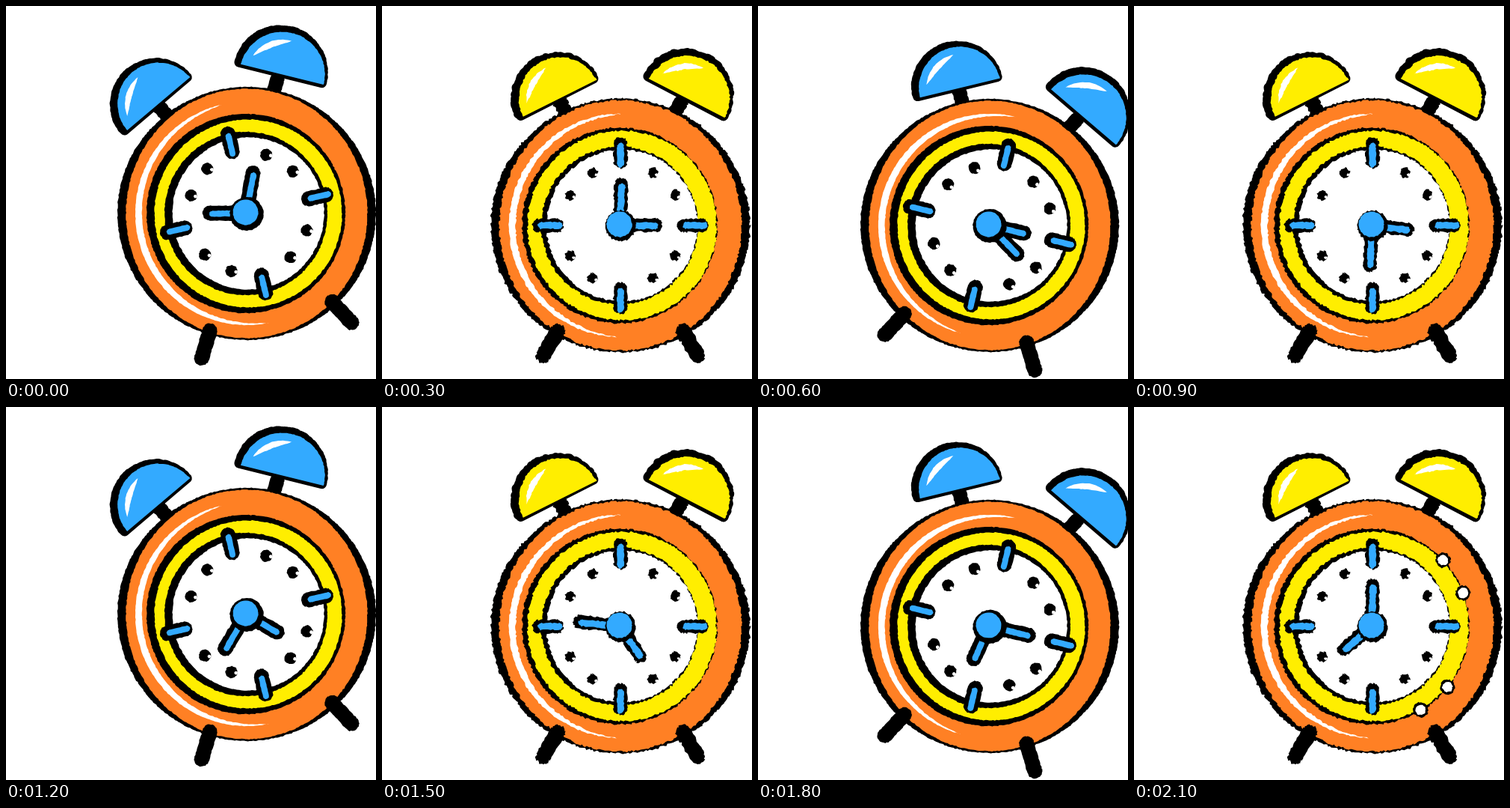
Write an HTML page with a canvas that moves like this. It is 495 px wide and 498 px high and loops after 2400 ms.

```html
<!DOCTYPE html>
<html lang="en">
<head>
<meta charset="utf-8">
<title>Alarm clock</title>
<style>
html, body { margin: 0; width: 100%; height: 100%; overflow: hidden; background: #fff; }
canvas { display: block; }
</style>
</head>
<body>
<canvas id="stage" width="495" height="498"></canvas>
<script>
const ctx = document.getElementById('stage').getContext('2d');
const BLACK = '#000', WHITE = '#fff', ORANGE = '#ff8024', YELLOW = '#ffee00', BLUE = '#33aaff';
const STEP = 300, DEG = Math.PI / 180;

// Each lean: centre, angle, bell colour, edge roughness, line widths and ring radii from outside in.
const TILTED = { bell: BLUE, rough: 0.55, bar: 20, stripe: 8, hub: 22.5, dot: 8, radii: [171, 164, 133, 125.5, 109, 101.5] };
const LEFT = { ...TILTED, x: 322, y: 277, angle: -13.3 };
const RIGHT = { ...TILTED, x: 310, y: 293, angle: 13.3 };
const UP = { x: 319, y: 293, angle: 0, bell: YELLOW, rough: 1.3, bar: 18, stripe: 9, hub: 20.5, dot: 6.8, radii: [171.5, 164.5, 130.5, 126.5, 105, 101] };

// Ring colour, sideways offset and widening.
const RINGS = [[BLACK, 0, 2], [ORANGE, 0, -2.5], [BLACK, -1, 0], [YELLOW, 2, 0], [BLACK, -1, 0], [WHITE, 2, 0]];

// Lean plus clockwise directions of the long and the short hand.
const POSES = [
  [LEFT, 10, 270], [UP, 2, 90], [RIGHT, 136, 103], [UP, 183, 97],
  [LEFT, 211, 120], [UP, 276, 146], [RIGHT, 103, 205], [UP, 1, 230]
];

let seed = 1;
function random() {
  seed = (seed * 16807) % 2147483647;
  return seed / 2147483647;
}

// Fills a polygon whose edge wobbles like dry chalk; a border widens it with round corners.
function fill(pts, color, rough, border = 0) {
  ctx.beginPath();
  for (const [x, y] of pts) {
    ctx.lineTo(x + (random() * 2 - 1) * rough, y + (random() * 2 - 1) * rough);
  }
  ctx.closePath();
  ctx.fillStyle = ctx.strokeStyle = color;
  ctx.fill();
  if (border) {
    ctx.lineWidth = border * 2;
    ctx.lineJoin = 'round';
    ctx.stroke();
  }
}

function path(n, point) {
  return Array.from({ length: n + 1 }, (_, i) => point(i / n));
}

function arc(x, y, rx, ry, from, to) {
  const n = Math.ceil(Math.abs(to - from) * DEG * (rx + ry) / 5) + 4;
  return path(n, t => {
    const a = (from + (to - from) * t) * DEG;
    return [x + rx * Math.cos(a), y + ry * Math.sin(a)];
  });
}

function disc(x, y, r, color, rough, widen = 0) {
  fill(arc(x, y, r + widen, r - widen, 0, 360), color, rough);
}

function bar(x0, y0, x1, y1, width, color, rough) {
  const dir = Math.atan2(y1 - y0, x1 - x0) / DEG, r = width / 2;
  const length = Math.hypot(x1 - x0, y1 - y0), n = Math.ceil(length / 3);
  const head = arc(x1, y1, r, r, dir - 90, dir + 90);
  const tail = arc(x0, y0, r, r, dir + 90, dir + 270);
  const side = (a, b) => path(n, t => [a[0] + (b[0] - a[0]) * t, a[1] + (b[1] - a[1]) * t]);
  fill([...head, ...side(head[head.length - 1], tail[0]), ...tail,
    ...side(tail[tail.length - 1], head[0])], color, rough);
}

// Crescent of light that tapers to both ends.
function gleam(r, from, to, width, rough) {
  const n = Math.ceil(r * (to - from) * DEG / 3);
  const edge = depth => path(n, t => {
    const a = (from + (to - from) * t) * DEG;
    const d = r - depth * Math.sin(Math.PI * t) ** 0.7;
    return [d * Math.cos(a), d * Math.sin(a)];
  });
  fill([...edge(0), ...edge(width).reverse()], WHITE, rough);
}

function bell(side, color, rough) {
  const r = 56 + side;
  bar(81 * side, -165, 70 * side, -145, 19, BLACK, rough);
  ctx.save();
  ctx.translate(4 + 85 * side, -169.5);
  ctx.rotate(27 * side * DEG);
  fill(arc(-3, -2, r, r, 180, 360), BLACK, rough, 6.5);
  fill(arc(0, 0, r, r, 180, 360), color, rough * 0.7);
  gleam(r * 0.82, 199, 272, 8, rough * 0.5);
  ctx.restore();
}

function dial({ rough, bar: width, stripe, dot }) {
  for (let hour = 0; hour < 12; hour++) {
    const ux = Math.sin(hour * 30 * DEG), uy = -Math.cos(hour * 30 * DEG);
    if (hour % 3) {
      const x = 3 + 81 * ux, y = 81 * uy;
      disc(x, y, dot, BLACK, rough);
      disc(x + dot * 0.7, y + 2.5, dot * 0.3, WHITE, rough * 0.4);
    } else {
      const dx = 3 * Math.abs(ux), dy = 3 * Math.abs(uy);
      bar(85 * ux, 85 * uy, 109 * ux, 109 * uy, width, BLACK, rough);
      bar(85 * ux + dx, 85 * uy + dy, 109 * ux + dx, 109 * uy + dy, stripe, BLUE, rough * 0.6);
    }
  }
}

function hands({ rough, bar: width, stripe, hub }, angles) {
  angles.forEach((angle, i) => {
    const length = 54 - 6 * i, ux = Math.sin(angle * DEG), uy = -Math.cos(angle * DEG);
    bar(0, 0, length * ux, length * uy, width, BLACK, rough);
    bar(0, 0, (length - 2) * ux + 1, (length - 2) * uy + 1, stripe, BLUE, rough * 0.6);
  });
  disc(1, 1, hub, BLACK, rough);
  disc(-0.5, -1, 17, BLUE, rough * 0.5);
}

function draw(step) {
  const [lean, ...angles] = POSES[step], { rough } = lean;
  const turned = paint => {
    ctx.save();
    ctx.rotate(lean.angle * DEG);
    paint();
    ctx.restore();
  };
  const ring = i => disc(RINGS[i][1], 0, lean.radii[i], RINGS[i][0], rough, RINGS[i][2]);

  seed = 77;
  ctx.fillStyle = WHITE;
  ctx.fillRect(0, 0, 495, 498);
  ctx.save();
  ctx.translate(lean.x, lean.y);
  turned(() => [-1, 1].forEach(side => bell(side, lean.bell, rough)));
  [0, 1].forEach(ring);
  turned(() => gleam(149, 92, 270, 9, rough * 0.7));
  [2, 3, 4, 5].forEach(ring);
  turned(() => {
    for (const side of [-1, 1]) bar(84 * side, 141, 103 * side, 174, 20, BLACK, rough);
    dial(lean);
  });
  ctx.translate(-1, -0.5);
  hands(lean, angles);
  if (step === POSES.length - 1) {
    for (const angle of [-43, -20, 39, 60]) {
      const x = 1 + 129 * Math.cos(angle * DEG), y = 129 * Math.sin(angle * DEG);
      disc(x, y, 10, BLACK, 1);
      disc(x, y, 7, WHITE, 0.8);
    }
  }
  ctx.restore();
}

let shown = -1;
function tick(now) {
  const step = Math.floor(Math.max(0, now) / STEP) % POSES.length;
  if (step !== shown) draw(shown = step);
  requestAnimationFrame(tick);
}
tick(performance.now());
</script>
</body>
</html>
```
